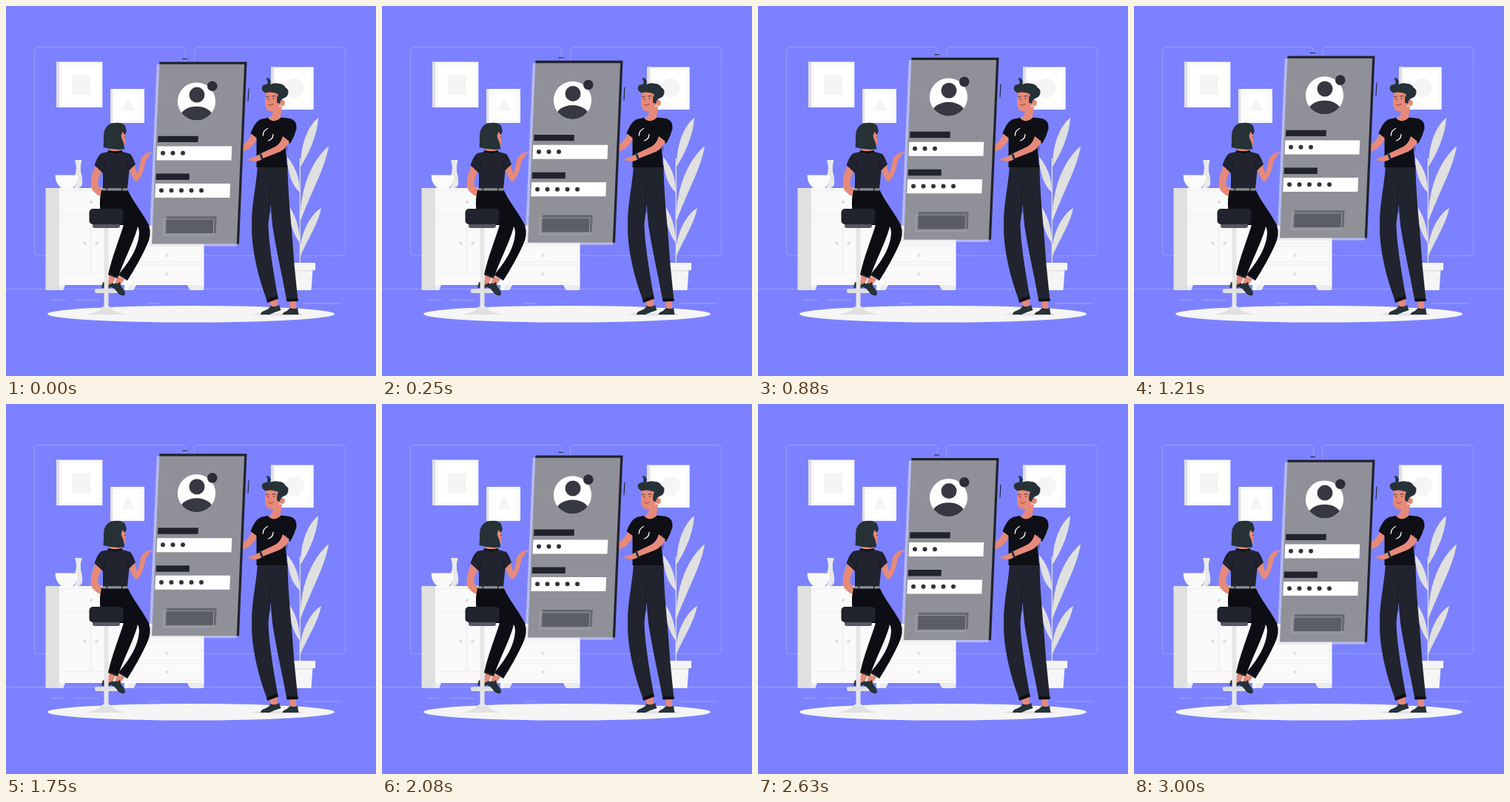
An HTML page with a canvas for the animation above (3040 ms loop, 500x500 px).

```html
<!DOCTYPE html>
<html lang="en">
<head>
<meta charset="utf-8">
<title>Login panel</title>
<style>
html, body { margin: 0; width: 100%; height: 100%; overflow: hidden; background: #7c82ff; }
canvas { display: block; width: 500px; height: 500px; }
</style>
</head>
<body>
<canvas id="stage" width="500" height="500"></canvas>
<script>
const ctx = document.getElementById('stage').getContext('2d');
const LOOP = 3040, STEP = 1000 / 24, HALF = 1500, RISE = 10, REST = 0.5;
const BG = '#7c82ff', NAVY = '#21232e', INK = '#0f1016', HAIR = '#263238',
  SKIN = '#e6897a', PALE = '#fafafa', SOFT = '#f5f5f5', GREY = '#e0e0e0';

function fill(d, color) {
  ctx.fillStyle = color;
  ctx.fill(new Path2D(d));
}
function line(d, color, width = 1) {
  ctx.strokeStyle = color;
  ctx.lineWidth = width;
  ctx.stroke(new Path2D(d));
}
function box(x1, y1, x2, y2, color, r = 0) {
  ctx.fillStyle = color;
  ctx.beginPath();
  ctx.roundRect(x1, y1, x2 - x1, y2 - y1, r);
  ctx.fill();
}
function frame(x1, y1, x2, y2, color, width, r = 0) {
  ctx.strokeStyle = color;
  ctx.lineWidth = width;
  ctx.beginPath();
  ctx.roundRect(x1, y1, x2 - x1, y2 - y1, r);
  ctx.stroke();
}
function oval(x, y, rx, ry, color) {
  ctx.fillStyle = color;
  ctx.beginPath();
  ctx.ellipse(x, y, rx, ry, 0, 0, Math.PI * 2);
  ctx.fill();
}
const dot = (x, y, r, color) => oval(x, y, r, r, color);

// Slanted block whose left and right sides lean like the panel
function slab(x, y, w, h, color, lean = h * 0.0427) {
  fill(`M${x} ${y}h${w}l${-lean} ${h}h${-w}z`, color);
}

function picture(x1, y1, x2, y2, side, pad) {
  box(x1, y1, x2, y2, PALE);
  box(x1, y1, x1 + side, y2, GREY);
  box(x1 + side + pad, y1 + pad, x2 - pad, y2 - pad, '#fff');
}

function room() {
  box(0, 0, 500, 500, BG);
  const faint = 'rgba(226,226,240,.45)';
  frame(38.5, 55.5, 242.5, 337.5, faint, 0.6, 5);
  frame(254.5, 55.5, 458.5, 337.5, faint, 0.6, 5);
  line('M0 382.5H500M62 397.5H81M92 397.5H125M191 402H210M402 402H453', faint, 0.7);

  picture(68, 75.5, 130.3, 137, 4, 4.5);
  box(89, 93, 114, 120, SOFT);
  picture(141, 112, 187, 158, 3, 4);
  fill('M165.5 125L175 142H156z', SOFT);
  picture(358, 82.5, 415.7, 140, 4, 4);
  dot(390, 111, 13.2, SOFT);
}

function cabinet() {
  fill('M66.500 228.500H98Q98 241 90 246H75Q67 241 66.500 228.500z', PALE);
  fill('M93 208H102.500Q100 216 101 224Q104 234 103 241Q101 246 97 246H92Q98 238 97 229H93Q97 219 93 208z', '#e9e9e9');
  fill('M53.500 246H72V384H53.500z', GREY);
  fill('M72 246H158V297H267.500V377L267 384H249L245 377H176L172 384H160V377H80L77 384H72z', PALE);
  fill('M245 377H267.500L267 384H249zM72 377H80L77 384H72zM166 377H176L172 384H164z', '#ececec');
  const edge = '#ebebeb';
  const parts = [[75.5, 249.5, 154, 279.5], [75.5, 283, 113.5, 361.5], [116, 283, 154, 361.5],
    [171, 301, 264, 321], [171, 324.5, 264, 346], [171, 350, 264, 373.5]];
  for (const p of parts) frame(...p, edge, 0.8);
  for (const [x, y] of [[115, 265], [106.5, 320.5], [122.5, 320.5], [217.5, 337], [217.5, 362]])
    dot(x, y, 2.2, GREY);
}

function plant() {
  const leaf = GREY;
  line('M397.300 348V206', leaf, 1.3);
  fill('M398 217C398 190 406 164 422 151C421 172 411 197 398 217z', leaf);
  fill('M398 290C397 254 409 213 436 189C432 217 414 248 398 290z', leaf);
  fill('M397 340C396 312 409 283 426 273C422 294 408 314 397 340z', leaf);
  fill('M397 252C387 243 380 225 380 204C389 214 397 230 397 252z', leaf);
  fill('M397 320C388 308 382 290 382 270C391 282 397 300 397 320z', leaf);
  fill('M383 356H414.500L412.500 384H385z', SOFT);
  box(380, 347, 418, 357, SOFT);
  box(383, 357, 414, 358.5, GREY);
}

function man() {
  oval(368, 416.8, 34, 1.8, GREY);
  // Feet
  fill('M356 396L366 395L368 408L358 409zM383 398H392V411H384z', SKIN);
  fill('M357.500 405Q363 408 369 404L371.500 411Q362 414 356 417H344Q344 413 350 411.500Q356 409 357.500 405z', HAIR);
  fill('M384 408Q389 410 394 408L395.500 417H373.500Q374 414 379 412.500z', HAIR);
  // Trousers
  fill('M340 216H380.500C381 250 384 280 386 302Q389 350 394.500 398L379.500 399C374 368 365 330 360 296L357.500 268L354.500 295C355 320 361 358 367.500 393L353 399C341 367 331.500 330 332 296C332 265 338 245 340 216z', NAVY);
  line('M358 237Q354 255 357 280', '#15171f', 0.8);
  line('M352.500 399L367.500 393.500M379.500 397.500L394.500 397', INK, 4);

  // Far arm, neck, shirt
  fill('M333 170L341 177C336 186 331 192 324 195L318 197V188Q328 184 333 170z', SKIN);
  fill('M361 138L373 135L371 150Q374 156 362 158Q354 158 354 152Q361 150 361 138z', SKIN);
  fill('M354 151Q361 160 372 150.500L384 152Q393 154 392.500 166Q390 176 384 186L377 181L380 218H338.500V178L330.500 172Q336 157 344 153z', INK);
  ctx.lineCap = 'round';
  line('M347.300 175Q347.500 168 353.500 165.500M361 173.500Q361 180 354.500 182', '#fff', 1.3);
  line('M379 176Q378 187 380 195', '#2a2d38', 0.7);

  // Near arm and hand
  fill('M374 176L383 183Q378 193 370 197L347 206L343 200L364 190Q371 186 374 176z', SKIN);
  fill('M345 200L347 206Q343 210 336 210Q332 208 325 208.500Q328 206 336 204Q340 201 345 200z', SKIN);
  line('M343.500 199.500L346 206', HAIR, 3);

  // Head
  fill('M351 117Q349 128 351 137Q353 143 360 142Q367 140 370 134L374 118Q364 110 351 117z', SKIN);
  oval(373.3, 131, 3.5, 4, SKIN);
  fill('M351 117.500Q344 114 346 109Q348 105.500 352 106Q355.500 103 351.500 97.500Q355.500 96 357.500 101Q358 104 357 106Q363 103 369 105Q375 105 377.500 110Q383 113 381 119Q380 123 376.500 124Q371 126 370 132L366.500 131Q365 125 368 119Q358 115 351 117.500z', HAIR);
  line('M351.500 122.500Q353 121.300 355 122.300M360 122Q362 120.700 364 122', HAIR, 0.9);
  dot(353.7, 125.6, 0.8, HAIR);
  dot(361.5, 125, 0.8, HAIR);
  line('M357 125Q355 129 357 130', '#bd5c4f', 0.7);
  line('M354.500 133.500Q358 135.500 361 132.500', '#7d3932', 0.9);
  ctx.lineCap = 'butt';
}

function panel(dy) {
  ctx.save();
  ctx.translate(0, dy);
  slab(207.5, 75, 118, 246, NAVY, 10.5);
  slab(203.8, 78.3, 118.3, 245.7, 'rgba(228,228,232,.57)', 10.5);
  line('M238.500 71H245', NAVY, 1.1);
  line('M328 111L327 128.500', NAVY, 1.1);

  // Avatar
  dot(257.5, 128.5, 25.6, '#fff');
  ctx.save();
  ctx.beginPath();
  ctx.arc(257.5, 128.5, 25.6, 0, Math.PI * 2);
  ctx.clip();
  oval(257.5, 150.5, 22.5, 15.3, '#363842');
  ctx.restore();
  dot(258, 119.6, 10.5, '#363842');
  dot(278.8, 107.7, 6.8, '#2b2d37');

  // Fields
  slab(205.4, 175.2, 54.5, 8.3, NAVY);
  slab(204.3, 189, 101, 19, '#fff');
  slab(203, 226, 45, 8.5, NAVY);
  slab(202.1, 239.5, 101, 19, '#fff');
  for (let i = 0; i < 3; i++) dot(212 + i * 13.5, 198.2, 3, '#30323c');
  for (let i = 0; i < 5; i++) dot(210 + i * 13.5, 248.8, 3, '#30323c');

  // Button
  slab(217, 283.7, 67.6, 22.8, '#66686e');
  slab(216.8, 287.5, 64, 19, '#5c5e65');
  line('M213.400 287.500H281L280.100 309.500H212.500z', '#aeafb3', 0.7);
  ctx.restore();
}

function woman() {
  // Stool stand
  fill('M109 417Q125 414 131 406H140Q146 414 162 417z', GREY);
  // Feet
  fill('M131 373L138 375L144 371L143 379L136 383L129 380z', HAIR);
  fill('M140 362L149 366L144 375L137 377zM151 365L160 369L154 378L146 376z', SKIN);
  box(132.5, 298, 138.5, 410, '#e6e6e6');
  box(120, 382, 151, 388, GREY, 2);
  fill('M143 374Q148 377 154 373Q155 380 159 383Q162 388 160 391Q153 392 150 386Q146 381 141 379z', HAIR);

  // Left arm and trousers
  fill('M120 217L130 222Q122 237 125 243L132 251L129 258Q116 252 114.500 243Q113.500 234 120 217z', SKIN);
  const cloth = '#0d0e13';
  fill('M129 248H164Q178 272 178 298C174 316 160 342 151 367.500L138 363C143 340 152 318 159 296H132Q126 280 127 261z', cloth);
  fill('M158 248H164C170 262 185 280 193 296Q197.500 309 190 324Q180 346 164 371L152 363C166 346 179 328 180 306Q180 296 168 284z', cloth);
  line('M138.500 362.500L150.500 367M152 363L164 370', '#24262f', 2);
  box(117, 293, 154, 300, '#555761', 3);
  box(112.5, 274, 158.5, 295, NAVY, 5);

  // Right arm
  fill('M166 218L174.500 215Q175 222 177 226Q181 219 182 207Q186 201 190 198.500L198 197.500V199.500L193 200.500Q195 204 189 208Q186 225 180 234Q176 239 172.500 234Q168 227 166 218z', SKIN);
  // Torso
  fill('M141 188H156V202H139z', SKIN);
  fill('M138 197Q148 201 158 197L168 200Q171 203 175 214L166.500 222L164 247H131L131 226L119.500 215Q124 202 129 199z', NAVY);
  line('M138 196.300Q148 199 157 196.300', INK, 3);
  line('M131 225Q134 218 133 212M166 222Q163 216 164 211', '#12131a', 0.7);
  box(130, 246.2, 164.5, 249.5, '#8b8c91');
  box(135.5, 245.5, 137, 250, NAVY);
  box(156, 245.5, 157.5, 250, NAVY);

  // Head
  fill('M153 170L160 169Q162 178 161 187Q159 190 153 189z', SKIN);
  fill('M132 177Q132 166 137 162Q141 158 147 158Q157 157 161 162L163 169Q162 173 160 174L158 170Q154 175 157 180Q160 186 160 193.500Q145 195 131.500 191Q132 184 132 177z', HAIR);
  line('M160 177.500L161.500 177', HAIR, 1);
}

function draw(time) {
  const k = Math.floor((time % LOOP + 5) / STEP);
  const rise = Math.max(0, RISE * (1 - Math.abs(k * STEP / HALF - 1)));
  room();
  plant();
  cabinet();
  oval(250, 416.3, 194, 11.3, SOFT);
  man();
  panel(REST - rise);
  woman();
}

const start = performance.now();
function tick() {
  draw(performance.now() - start);
  requestAnimationFrame(tick);
}
tick();
</script>
</body>
</html>
```
